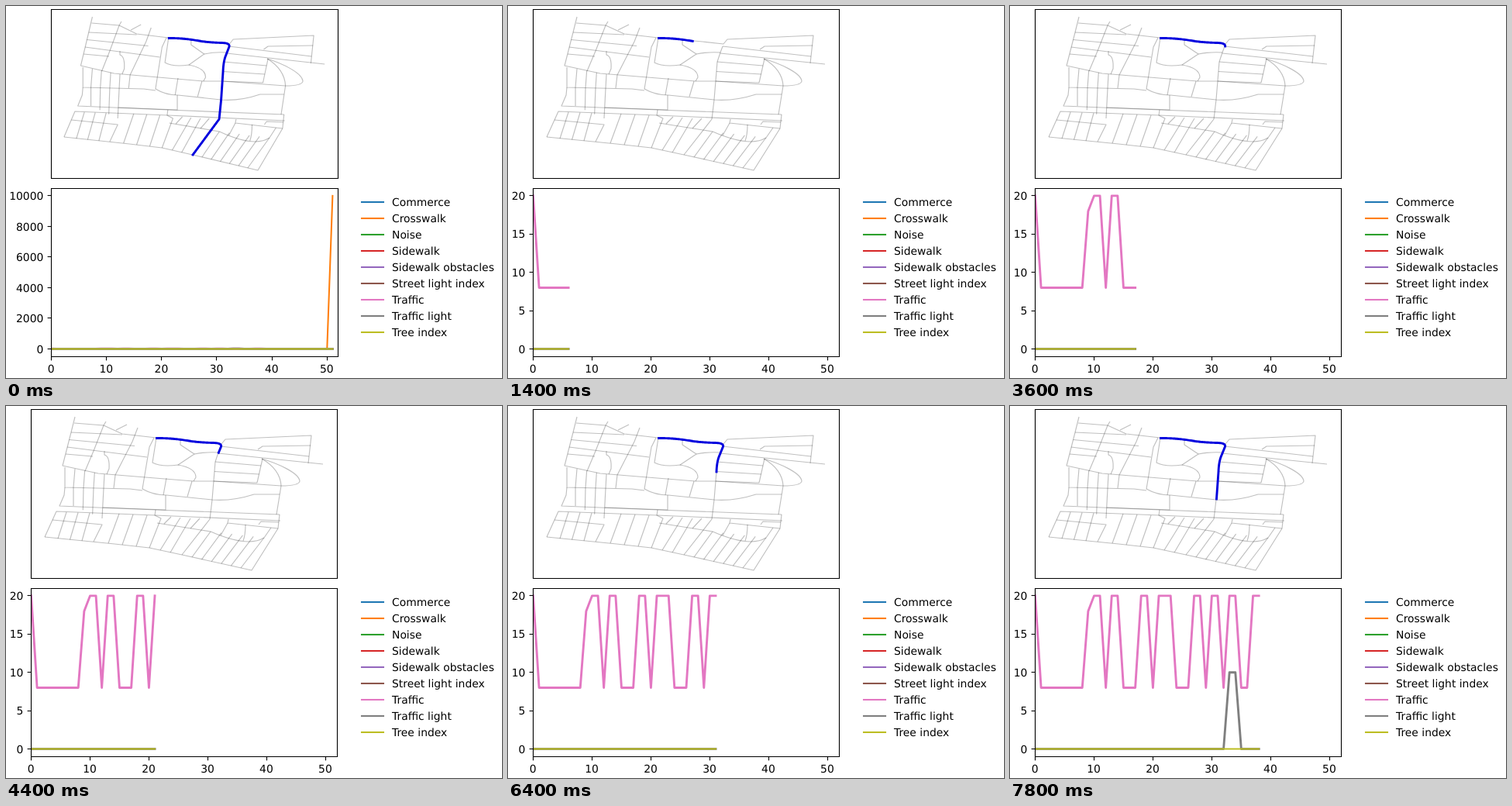
Animation of 640 by 480 pixels, one loop 8 s. Source, as an HTML page:

```html
<!DOCTYPE html>
<html lang="en">
<head>
<meta charset="utf-8">
<title>Route and street factors</title>
<style>
html, body { margin: 0; width: 100%; height: 100%; overflow: hidden; background: #fff; }
svg { display: block; width: 640px; height: 480px; }
path { fill: none; }
text { font: 13.89px "DejaVu Sans", sans-serif; fill: #000; text-rendering: geometricPrecision; }
.axis { stroke: #000; stroke-width: 1.11; }
.series { stroke-width: 2.08; stroke-linecap: square; stroke-linejoin: round; }
.bold { stroke-width: 2.9; }
.street, .route { stroke-linejoin: round; vector-effect: non-scaling-stroke; }
.street { stroke: #000; stroke-opacity: .25; stroke-width: 1.15; }
.route { stroke: #0000de; stroke-width: 2.9; stroke-linecap: square; }
</style>
</head>
<body>
<svg viewBox="0 0 640 480">
  <defs><clipPath id="plot"><rect id="clip" y="235.5" height="217"/></clipPath></defs>
  <g id="map"><g id="streets"></g><path id="route" class="route"/></g>
  <g id="lines" clip-path="url(#plot)"></g>
  <g id="axes"></g>
  <g id="legend"></g>
</svg>
<script>
const LOOP = 8000, STEP = 200, LAST = 51;
const ZERO = 442.5, SPAN = 197.6;
const $ = id => document.getElementById(id);
const line = (d, cls, color) =>
  `<path class="${cls}" d="${d}"${color ? ` stroke="${color}"` : ''}/>`;
const label = (x, y, s, anchor = 'start') =>
  `<text x="${x}" y="${y}" text-anchor="${anchor}">${s}</text>`;
const mix = (a, b, k) => a + (b - a) * k;

const LEGEND = [
  ['Commerce', '#1f77b4'], ['Crosswalk', '#ff7f0e'], ['Noise', '#2ca02c'],
  ['Sidewalk', '#d62728'], ['Sidewalk obstacles', '#9467bd'],
  ['Street light index', '#8c564b'], ['Traffic', '#e377c2'],
  ['Traffic light', '#7f7f7f'], ['Tree index', '#bcbd22']
];
const COLOR = Object.fromEntries(LEGEND);

const mainRoads = [
  'M89 14L84 34L73 77L119 87L180 92L242 97H268',
  'M88 22L126 25L150 36L194 41L251 46L278 49L283 43L394 38L390 74',
  'M129 20L126 25L113 58L102 84',
  'M170 28L163 46L141 89L139 106',
  'M191 41L185 53L176 107',
  'M76 79V105L160 107L176 109',
  'M76 105L75 115L69 129L193 134L353 140',
  'M125 131L206 134V115',
  'M355 103L349 140',
  'M50 169L65 136L193 141L354 148',
  'M50 169L140 178L185 183L227 192L317 212L351 158L353 140',
  'M60 147L124 153L113 175',
  'M277 52L274 60L270 72L266 121L263 146L227 192'
];
const curvedRoads = [
  'M127 58V63Q134 65 133 81L130 88',
  'M194 41L189 73Q200 79 222 76Q245 80 245 92L242 97',
  'M225 43V50L243 62L222 76',
  'M243 62Q258 59 274 60',
  'M176 107Q190 115 207 115L266 121Q292 123 320 114H353',
  'M330 68C350 74 378 86 379 97Q378 103 355 103L268 97',
  'M330 68Q354 82 355 103',
  'M193 134L192 141L200 145L185 183',
  'M195 151L264 162Q312 183 333 170L342 157',
  'M287 146L286 151L351 158',
  'M309 153Q309 166 306 174'
];
const sideStreets = [
  'M142 31L156 24', 'M77 62L112 65', 'M331 68L324 99', 'M325 56L331 52L393 51',
  'M207 93L203 115', 'M240 97L234 117', 'M213 143L204 152',
  'M250 145L238 158', 'M286 151L277 167', 'M326 153L329 149L352 150'
];

// n parallel streets, each crossing all the given rails [x0, y0, x1, y1]
const rungs = (n, ...rails) => Array.from({ length: n }, (_, i) =>
  'M' + rails.map(([ax, ay, bx, by]) => {
    const k = i / (n - 1);
    return [mix(ax, bx, k), mix(ay, by, k)];
  }).join('L'));
const blocks = [
  rungs(3, [84, 34, 79, 53], [150, 37, 182, 66]),
  rungs(4, [89, 81, 127, 88], [87, 105, 126, 106], [87, 129, 124, 145]),
  rungs(3, [78, 137, 108, 138], [67, 171, 98, 174]),
  rungs(3, [146, 139, 182, 141], [132, 177, 168, 181]),
  rungs(2, [225, 144, 238, 145], [199, 186, 212, 189]),
  rungs(6, [264, 162, 333, 170], [240, 195, 303, 209]),
  rungs(3, [270, 72, 268, 97], [329, 77, 324, 99]),
  rungs(2, [277, 52, 274, 61], [391, 65, 409, 75])
];

const WAY = 'M194.5 41.5Q215 41.2 239 45.5Q252 47.2 269 47.6Q278 48 277.7 52' +
  'L273 63.5Q269.5 71 269 85L266.4 121L263.7 146L227.4 192';
const way = document.createElementNS('http://www.w3.org/2000/svg', 'path');
way.setAttribute('d', WAY);

// Walked distance: step, length along the way
const WALK = [[0, 0], [6, 44], [11, 59], [12, 74.5], [23, 99], [29, 119], [31, 120],
  [38, 155], [LAST, way.getTotalLength()]];

function walked(n) {
  const i = Math.max(1, WALK.findIndex(([s]) => s >= n));
  const [s0, d0] = WALK[i - 1], [s1, d1] = WALK[i];
  return mix(d0, d1, (n - s0) / (s1 - s0));
}

function routePath(n) {
  const end = walked(n), pts = [];
  for (let d = 0; d < end; d += 1.5) pts.push(way.getPointAtLength(d));
  pts.push(way.getPointAtLength(end));
  return 'M' + pts.map(p => `${p.x.toFixed(2)} ${p.y.toFixed(2)}`).join('L') + (end ? '' : 'v.1');
}

// One letter per step: h = 20, m = 18, l = 8
const LEVELS = 'hllllllllmhhlhhlllhhlhhhlllhhlhhlhhllhh';
const traffic = i => ({ h: 20, m: 18 })[LEVELS[i]] || 8;
const light = i => i === 33 || i === 34 ? 10 : 0;
const crosswalk = i => i === LAST ? 10000 : 0;

function render(n) {
  const wide = n < LAST;
  const left = wide ? 32.5 : 58.5, width = wide ? 395 : 370, right = left + width;
  const max = wide ? 20 : 10000, gap = wide ? 5 : 2000;
  const X = i => left + i * width / 52;
  const Y = v => ZERO - v * SPAN / max;
  const snap = v => Math.floor(v) + .5;

  const k = width / 395;
  $('map').setAttribute('transform', `translate(${left - 32.5 * k} 0) scale(${k} 1)`);
  $('route').setAttribute('d', routePath(n));

  $('clip').setAttribute('x', left);
  $('clip').setAttribute('width', width);
  const plot = (name, f, cls = 'series') => {
    const pts = Array.from({ length: n + 1 }, (_, i) => `${X(i).toFixed(2)} ${Y(f(i)).toFixed(2)}`);
    return line('M' + pts.join('L'), cls, COLOR[name]);
  };
  $('lines').innerHTML = (wide ? '' : plot('Crosswalk', crosswalk)) +
    plot('Traffic', traffic, 'series bold') +
    plot('Traffic light', light, 'series bold') +
    plot('Tree index', () => 0);

  let out = '';
  for (const [top, bottom] of [[4.5, 222.5], [235.5, 452.5]]) {
    out += line(`M${left} ${top}H${right}V${bottom}H${left}Z`, 'axis');
  }
  for (let i = 0; i <= 50; i += 10) {
    out += line(`M${snap(X(i))} 452.5v4.9`, 'axis') + label(X(i) - .4, 473, i, 'middle');
  }
  for (let v = 0; v <= max; v += gap) {
    out += line(`M${left} ${snap(Y(v))}h-4.9`, 'axis') +
      label(left - 10.2, Math.round(Y(v) + 5.1), v, 'end');
  }
  $('axes').innerHTML = out;
}

$('streets').innerHTML = [mainRoads, curvedRoads, sideStreets, ...blocks].flat()
  .map(d => line(d, 'street')).join('');
$('legend').innerHTML = LEGEND.map(([name, color], i) =>
  line(`M459 ${253 + 21 * i}h28`, 'series', color) + label(498, 258 + 21 * i, name)).join('');

let shown = -1;
function tick() {
  const slot = Math.floor(performance.now() % LOOP / STEP);
  if (slot !== shown) {
    shown = slot;
    render(slot === 0 ? LAST : slot - 1);
  }
  requestAnimationFrame(tick);
}
tick();
</script>
</body>
</html>
```
